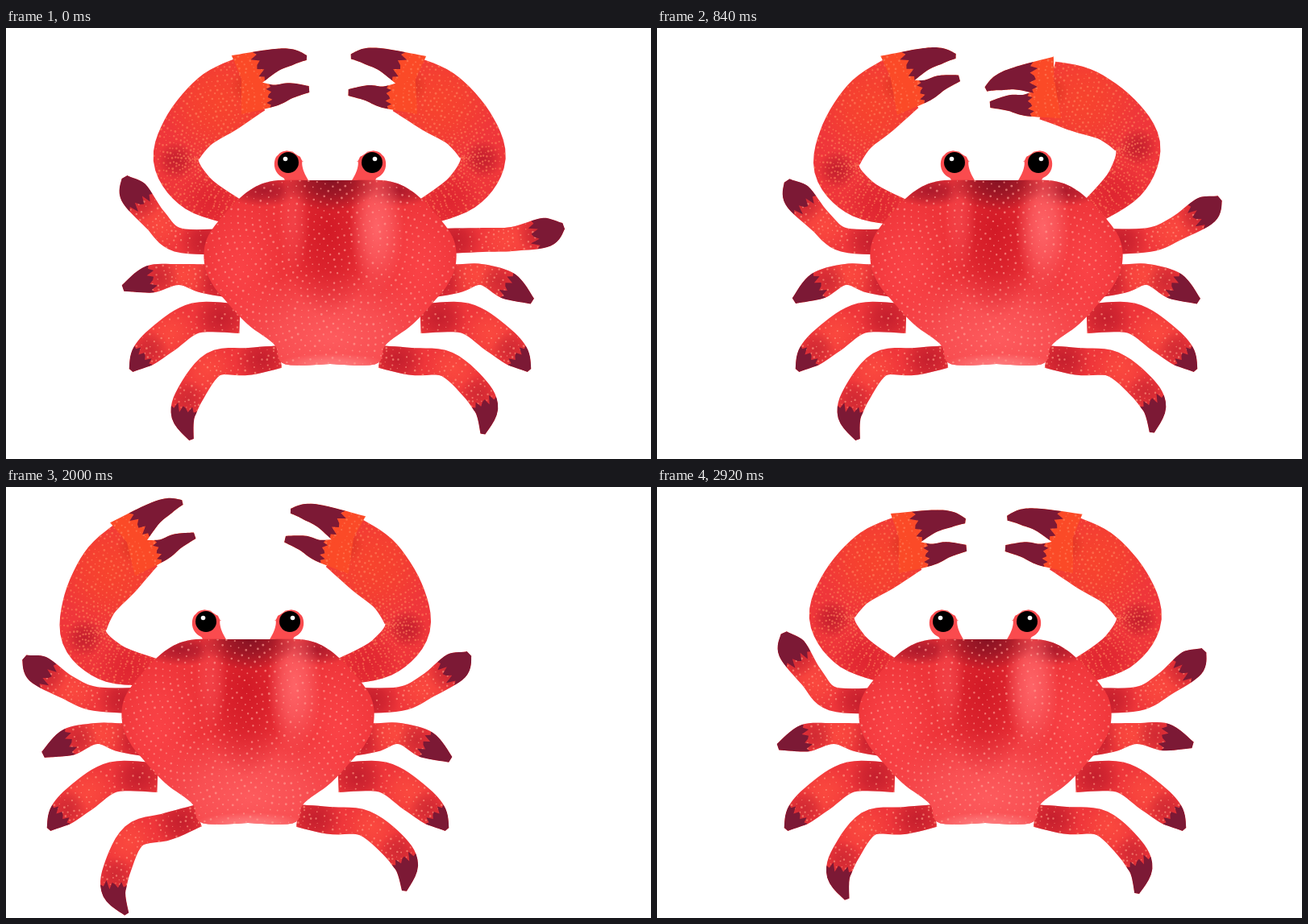
An HTML page with a canvas for the animation above (2960 ms loop, 800 px wide and 535 px high).

```html
<!DOCTYPE html>
<html lang="en">
<head>
<meta charset="utf-8">
<title>Crab</title>
<style>
html, body { margin: 0; width: 100%; height: 100%; overflow: hidden; background: #fff; }
canvas { display: block; width: 800px; height: 535px; }
</style>
</head>
<body>
<canvas id="stage" width="800" height="535"></canvas>
<script>
const ctx = document.getElementById('stage').getContext('2d');
const LOOP = 2960, STEP = 40, AXIS = 402;
const RED = '#ef363a', DARK = '#7c1935', SHADE = '#b31528', ORANGE = '#fb4a27';

const mirror = ([x, y]) => [2 * AXIS - x, y];

function seeded(seed) {
  return () => (seed = (seed * 16807) % 2147483647) / 2147483647;
}

// --- motion ---

// Sum of harmonics of the loop, zero at its start; each term is [cosine, sine]
function wave(t, ...terms) {
  return terms.reduce((sum, [c, s], i) => {
    const a = (i + 1) * 2 * Math.PI * t / LOOP;
    return sum + c * (1 - Math.cos(a)) + s * Math.sin(a);
  }, 0);
}

// Monotone cubic curve through [time, value] keys
function track(...keys) {
  const rise = keys.slice(1).map((k, i) => (k[1] - keys[i][1]) / (k[0] - keys[i][0]));
  const slope = keys.map((k, i) => {
    const a = rise[i - 1] ?? rise[i], b = rise[i] ?? a;
    return a * b <= 0 ? 0 : 2 * a * b / (a + b);
  });
  return t => {
    let i = 0;
    while (i < keys.length - 2 && t > keys[i + 1][0]) i++;
    const [t0, v0] = keys[i], [t1, v1] = keys[i + 1];
    const h = t1 - t0, s = (t - t0) / h, r = 1 - s;
    return v0 * (1 + 2 * s) * r * r + slope[i] * h * s * r * r
      + v1 * s * s * (3 - 2 * s) - slope[i + 1] * h * s * s * r;
  };
}

const walk = track([0, 0], [520, -118], [840, 19], [1080, 89], [1320, 64],
  [1720, -31], [2090, -110], [2280, -28], [2520, 89], [2920, 5], [LOOP, 0]);

const footfalls = [0, 520, 840, 1320, 1720, 2280, LOOP];

function lift(t) {
  const i = footfalls.findIndex(f => f > t);
  const s = (t - footfalls[i - 1]) / (footfalls[i] - footfalls[i - 1]);
  return Math.sin(Math.PI * s) ** 2;
}

// Joint angles in degrees, as seen on the left half of the crab
function pose(t) {
  const late = (t / LOOP) ** 8;
  return {
    left: {
      swing: wave(t, [-2.5, 0], [-3.8, -6.5]),
      open: wave(t, [2.5, 3.9], [-3, 8], [0, 4.7]),
      legs: [wave(t, [-7, -2], [-2, -8], [0, -9]), wave(t, [-4, -3], [-3, 0]), 0, -11 * lift(t)]
    },
    right: {
      swing: 1.5 - wave(t, [5, -11], [-4.3, -1.3]),
      open: wave(t, [0, 6], [-5, 9], [0, 7]) + 3,
      legs: [wave(t, [1, 0], [11, 4]) + 30 * late - 40, 18 * late - 14, 0, wave(t, [0, 2], [1, 4]) + 11]
    }
  };
}

// --- geometry: a limb is a spine of [x, y, half width] ---

function turn(spine, [px, py], degrees, from = 0) {
  const a = degrees * Math.PI / 180, c = Math.cos(a), s = Math.sin(a);
  return spine.map((p, i) => i < from ? p
    : [px + (p[0] - px) * c - (p[1] - py) * s, py + (p[0] - px) * s + (p[1] - py) * c, p[2]]);
}

function spline(pts, u) {
  const last = pts.length - 1, f = Math.min(u * last, last - 1e-6), i = Math.floor(f), s = f - i;
  const [a, b, c, d] = [-1, 0, 1, 2].map(k => pts[Math.max(0, Math.min(last, i + k))]);
  return b.map((v, k) => v + s / 2 * (c[k] - a[k]
    + s * (2 * a[k] - 5 * v + 4 * c[k] - d[k] + s * (3 * (v - c[k]) + d[k] - a[k]))));
}

// Point at u along the spine and v (-1..1) across it
function onLimb(spine, u, v) {
  const [x, y, w] = spline(spine, u);
  const [x0, y0] = spline(spine, Math.max(0, u - .01)), [x1, y1] = spline(spine, Math.min(1, u + .01));
  const len = Math.hypot(x1 - x0, y1 - y0) || 1;
  return [x - (y1 - y0) / len * w * v, y + (x1 - x0) / len * w * v];
}

function polygon(pts) {
  const path = new Path2D();
  pts.forEach(p => path.lineTo(p[0], p[1]));
  path.closePath();
  return path;
}

function limbPath(spine, from = 0) {
  const N = 32, pts = [];
  for (let i = 0; i <= N; i++) pts.push(onLimb(spine, from + (1 - from) * i / N, 1));
  for (let i = N; i >= 0; i--) pts.push(onLimb(spine, from + (1 - from) * i / N, -1));
  // ragged edge where the dark tip begins
  if (from) for (let k = 1; k < 9; k++) pts.push(onLimb(spine, from + .035 * Math.sin(k * 2.4), k / 4.5 - 1));
  return polygon(pts);
}

// --- painting ---

function glow(x, y, rx, ry, color, alpha) {
  ctx.save();
  ctx.translate(x, y);
  ctx.scale(rx, ry);
  const g = ctx.createRadialGradient(0, 0, 0, 0, 0, 1);
  g.addColorStop(0, color);
  g.addColorStop(.45, color + 'b0');
  g.addColorStop(1, color + '00');
  ctx.globalAlpha = alpha;
  ctx.fillStyle = g;
  ctx.fillRect(-1, -1, 2, 2);
  ctx.restore();
}

function disc(x, y, r, color) {
  ctx.fillStyle = color;
  ctx.beginPath();
  ctx.arc(x, y, r, 0, 7);
  ctx.fill();
}

function limbDots(spine, gap, color) {
  const rnd = seeded(17), specks = new Path2D();
  const length = spine.slice(1).reduce((sum, p, i) => sum + Math.hypot(p[0] - spine[i][0], p[1] - spine[i][1]), 0);
  const rows = Math.round(length / gap), cols = Math.round(2 * Math.max(...spine.map(p => p[2])) / gap);
  for (let i = 0; i < rows; i++)
    for (let k = 0; k < cols; k++) {
      const u = (i + rnd() * .5) / rows, v = (k + (i % 2) / 2 + rnd() * .4) / cols * 2 - 1;
      const [x, y] = onLimb(spine, u, v), r = .6 + rnd() * .9;
      specks.moveTo(x + r, y);
      specks.arc(x, y, r, 0, 7);
    }
  ctx.globalAlpha = .65;
  ctx.fillStyle = color;
  ctx.fill(specks);
}

function drawLimb(spine, { base = RED, tints = [], gap = 7.5, dot = '#ff9a83', cut = 0 }) {
  const outline = limbPath(spine);
  ctx.save();
  ctx.fillStyle = base;
  ctx.fill(outline);
  ctx.clip(outline);
  for (const [u, color, size] of tints) {
    const [x, y] = spline(spine, u);
    glow(x, y, size, size, color, .7);
  }
  limbDots(spine, gap, dot);
  if (cut) {
    ctx.globalAlpha = 1;
    ctx.fillStyle = DARK;
    ctx.fill(limbPath(spine, cut));
  }
  ctx.restore();
}

// --- the crab ---

const legs = [
  { spine: [[275,265,16], [213,263,15], [185,238,15], [158,204,18], [147,185,4]], knee: 1, cut: .65 },
  { spine: [[280,315,20], [245,311,18], [214,306,13], [178,312,17], [145,323,4]], knee: 2, cut: .73 },
  { spine: [[290,361,18], [235,360,19], [197,384,20], [170,407,16], [155,425,3]], knee: 1, cut: .74 },
  { spine: [[340,408,14], [300,414,17], [258,417,16], [230,452,17], [220,481,15], [230,511,3]], knee: 2, cut: .74 }
];
const legTints = [[.12, SHADE, 34], [.45, '#ff5040', 34], [.66, '#c42430', 24]];

const arm = [[283,228,17], [235,203,25], [211,165,28], [228,125,33], [265,92,40], [303,70,37]];
const upperFinger = [[290,58,26], [330,41,15], [355,36,10], [373,37,3]];
const lowerFinger = [[292,84,23], [330,84,14], [352,78,10], [376,76,4]];
const shoulder = [290, 220], hinge = [300, 66];
const armLook = { gap: 6, dot: '#ff8059', tints: [[.12, '#d81e2c', 42], [.4, SHADE, 24], [.8, ORANGE, 72], [.97, '#d8321f', 22]] };
const fingerLook = cut => ({ base: ORANGE, gap: 6, dot: '#ff8059', cut });

function drawClaw({ swing, open }) {
  const posed = (spine, bend) => turn(turn(spine, hinge, bend), shoulder, swing);
  drawLimb(posed(arm, 0), armLook);
  drawLimb(posed(lowerFinger, open * .45), fingerLook(.3));
  drawLimb(posed(upperFinger, -open), fingerLook(.2));
}

function drawLeg({ spine, knee, cut }, angle, whole) {
  const joint = whole ? 0 : knee;
  drawLimb(turn(spine, spine[joint], angle, joint), { cut, tints: legTints });
}

function drawEye() {
  drawLimb([[352,153,4], [351,159,14], [351,170,18], [357,182,13], [362,196,15]],
    { base: '#fa4b4e', gap: 50 });
  disc(350, 167, 13, '#000');
  disc(346.5, 162.5, 2.8, '#fff');
}

function drawSide(joints, right) {
  ctx.save();
  if (right) {
    ctx.translate(2 * AXIS, 0);
    ctx.scale(-1, 1);
  }
  legs.forEach((leg, i) => drawLeg(leg, joints.legs[i], !right && i === 3));
  drawClaw(joints);
  drawEye();
  ctx.restore();
}

const flank = [[375,189], [330,190], [300,203], [270,232], [249,262], [246,292],
  [256,318], [272,338], [300,368], [333,393], [345,417], [AXIS,417]];
const shell = polygon(Array.from({ length: 81 }, (_, i) => spline(flank, i / 80))
  .flatMap((p, i, half) => [p, mirror(half[80 - i])])
  .map((_, i, all) => i < 81 ? all[2 * i] : all[2 * (i - 81) + 1]));

// Speckles on a sunflower spiral
const shellDots = new Path2D();
const shellRnd = seeded(5);
for (let i = 1; i < 1300; i++) {
  const r = 4.8 * Math.sqrt(i), a = i * 2.39996, size = .6 + shellRnd() * .9;
  const x = AXIS + r * Math.cos(a), y = 310 + r * Math.sin(a);
  shellDots.moveTo(x + size, y);
  shellDots.arc(x, y, size, 0, 7);
}

function drawShell() {
  ctx.save();
  ctx.fillStyle = '#ee3439';
  ctx.fill(shell);
  ctx.clip(shell);
  glow(405, 385, 150, 85, '#ff5f61', .9);
  for (const side of [-1, 1]) {
    glow(AXIS + side * 112, 300, 52, 90, '#ff484b', .7);
    glow(AXIS + side * 82, 202, 48, 20, '#9c1328', .8);
  }
  glow(400, 250, 58, 110, '#cf1724', .9);
  glow(357, 240, 20, 65, '#ff5659', .5);
  glow(460, 248, 34, 82, '#ff6669', .95);
  glow(404, 190, 58, 38, '#7d1022', .9);
  glow(405, 418, 70, 14, '#ff8587', .8);
  ctx.globalAlpha = .65;
  ctx.fillStyle = '#ff9d92';
  ctx.fill(shellDots);
  ctx.restore();
}

function draw(t) {
  const { left, right } = pose(t);
  ctx.fillStyle = '#fff';
  ctx.fillRect(0, 0, 800, 535);
  ctx.save();
  ctx.translate(walk(t), 0);
  drawSide(left, false);
  drawSide(right, true);
  drawShell();
  ctx.restore();
}

const start = performance.now();
function tick() {
  const t = (performance.now() - start) % LOOP;
  draw(Math.floor(t / STEP) * STEP);
  requestAnimationFrame(tick);
}
tick();
</script>
</body>
</html>
```
